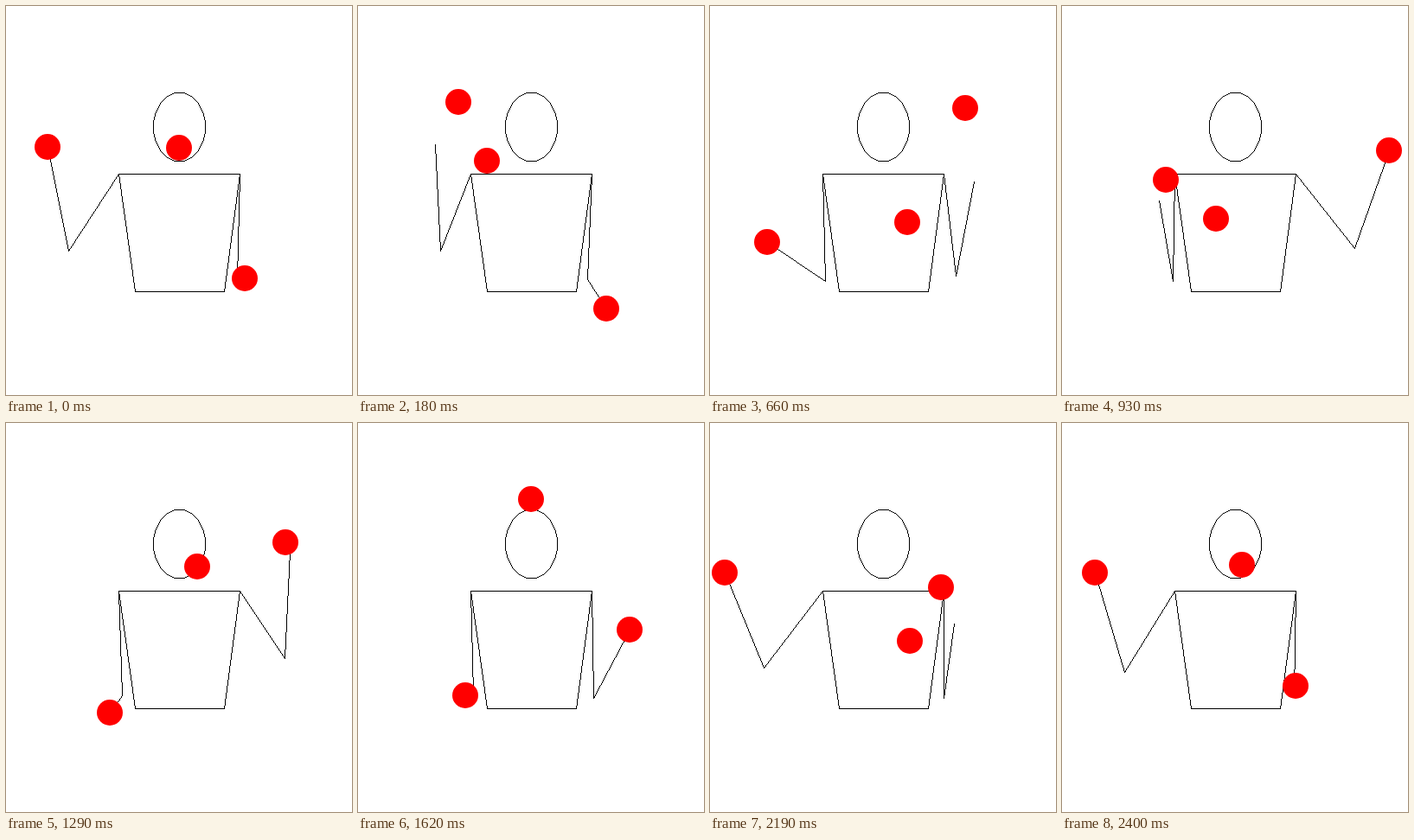
Recreate the animation shown at these times as an HTML page with a canvas. Size 400x450 px, loop 2.43 s.

```html
<!DOCTYPE html>
<html lang="en">
<head>
<meta charset="utf-8">
<title>Three-ball juggler</title>
<style>
  html, body { margin: 0; width: 100%; height: 100%; overflow: hidden; background: #fff; }
  canvas { display: block; }
</style>
</head>
<body>
<canvas width="400" height="450"></canvas>
<script>
// Times are in ticks of 30 ms; x is measured from the body's centre line.
const TICK = 30, BEAT = 13.5, HALF = 3 * BEAT, LOOP = 6 * BEAT;
const RISE = 75.5;                                      // height of every throw
const SPOTS = [[-151.53, 163.4], [-113.65, 239.15], [-75.77, 314.9]]; // left-hand throws
const SHOULDER = [-69.7, 194.2], ARM = 124.3, REACH = 90.9; // REACH: hands in front of body

const ctx = document.querySelector('canvas').getContext('2d');
const mod = (a, n) => ((a % n) + n) % n;
const pixel = ([x, y]) => [Math.round(200 + x), Math.round(y)];
const mirror = ([x, y]) => [-x, y];
const throwSpeed = ([x]) => [-x / BEAT, -2 * RISE / BEAT];

function hermite(a, va, b, vb, s) {
  const r = 1 - s;
  return a + (b - a) * s * s * (3 - 2 * s) + BEAT * s * r * (va * r - vb * s);
}

// Smooth spline: leaves each throw at the ball's speed, constant curvature at the catch.
function leftHand(t) {
  t = mod(t, LOOP);
  const i = Math.floor(t / (2 * BEAT)), s = t / BEAT - 2 * i;
  const from = SPOTS[i], to = SPOTS[(i + 1) % 3];
  const v0 = throwSpeed(from), v1 = throwSpeed(to);
  return from.map((a, k) => {
    const b = to[k], vCatch = (3 * (b - a) / BEAT - v0[k] - v1[k]) / 4;
    return s < 1 ? hermite(a, v0[k], b, vCatch, s) : hermite(b, vCatch, b, v1[k], s - 1);
  });
}

const rightHand = t => mirror(leftHand(t + HALF));

// Each ball keeps to one height, thrown by the left and right hand in turn.
function ballAt(i, t) {
  const u = mod(t - 2 * BEAT * i, LOOP), fromLeft = u < HALF;
  const s = (u % HALF) / BEAT - 1;
  if (s >= 1) return fromLeft ? rightHand(t) : leftHand(t);
  const [x, y] = SPOTS[i];
  return [(fromLeft ? -x : x) * s, y - RISE * (1 - s * s)];
}

// The elbow hangs below the line from shoulder to hand, seen from the front.
function leftArm(hand) {
  const dx = hand[0] - SHOULDER[0], dy = hand[1] - SHOULDER[1];
  const flat = Math.hypot(dx, REACH), dist = Math.hypot(flat, dy);
  const drop = Math.sqrt(Math.max(0, ARM * ARM - dist * dist / 4));
  const elbow = [
    SHOULDER[0] + dx / 2 - drop * dy / dist * dx / flat,
    SHOULDER[1] + dy / 2 + drop * flat / dist
  ];
  return [SHOULDER, elbow, hand];
}

// One-pixel lines without smoothing.
function line(from, to) {
  const [x0, y0] = pixel(from), [x1, y1] = pixel(to);
  const steps = Math.max(Math.abs(x1 - x0), Math.abs(y1 - y0));
  for (let i = 0; i <= steps; i++) {
    const f = i / (steps || 1);
    ctx.fillRect(Math.round(x0 + (x1 - x0) * f), Math.round(y0 + (y1 - y0) * f), 1, 1);
  }
}

const polyline = points => points.slice(1).forEach((p, i) => line(points[i], p));

const head = Array.from({ length: 21 }, (_, j) => {
  const a = (j + 0.5) * Math.PI / 10;
  return [30.3 * Math.cos(a), 139.5 + 39.6 * Math.sin(a)];
});
const waist = [-51.5, 330];
const torso = [SHOULDER, mirror(SHOULDER), mirror(waist), waist, SHOULDER];

function draw(t) {
  ctx.fillStyle = '#fff';
  ctx.fillRect(0, 0, 400, 450);
  ctx.fillStyle = '#000';
  [head, torso, leftArm(leftHand(t)), leftArm(leftHand(t + HALF)).map(mirror)].forEach(polyline);
  ctx.fillStyle = '#f00';
  SPOTS.forEach((_, i) => {
    ctx.beginPath();
    ctx.arc(...pixel(ballAt(i, t)), 15, 0, 2 * Math.PI);
    ctx.fill();
  });
}

const start = performance.now();
function loop() {
  draw(Math.floor((performance.now() - start) / TICK) % LOOP);
  requestAnimationFrame(loop);
}
loop();
</script>
</body>
</html>
```
